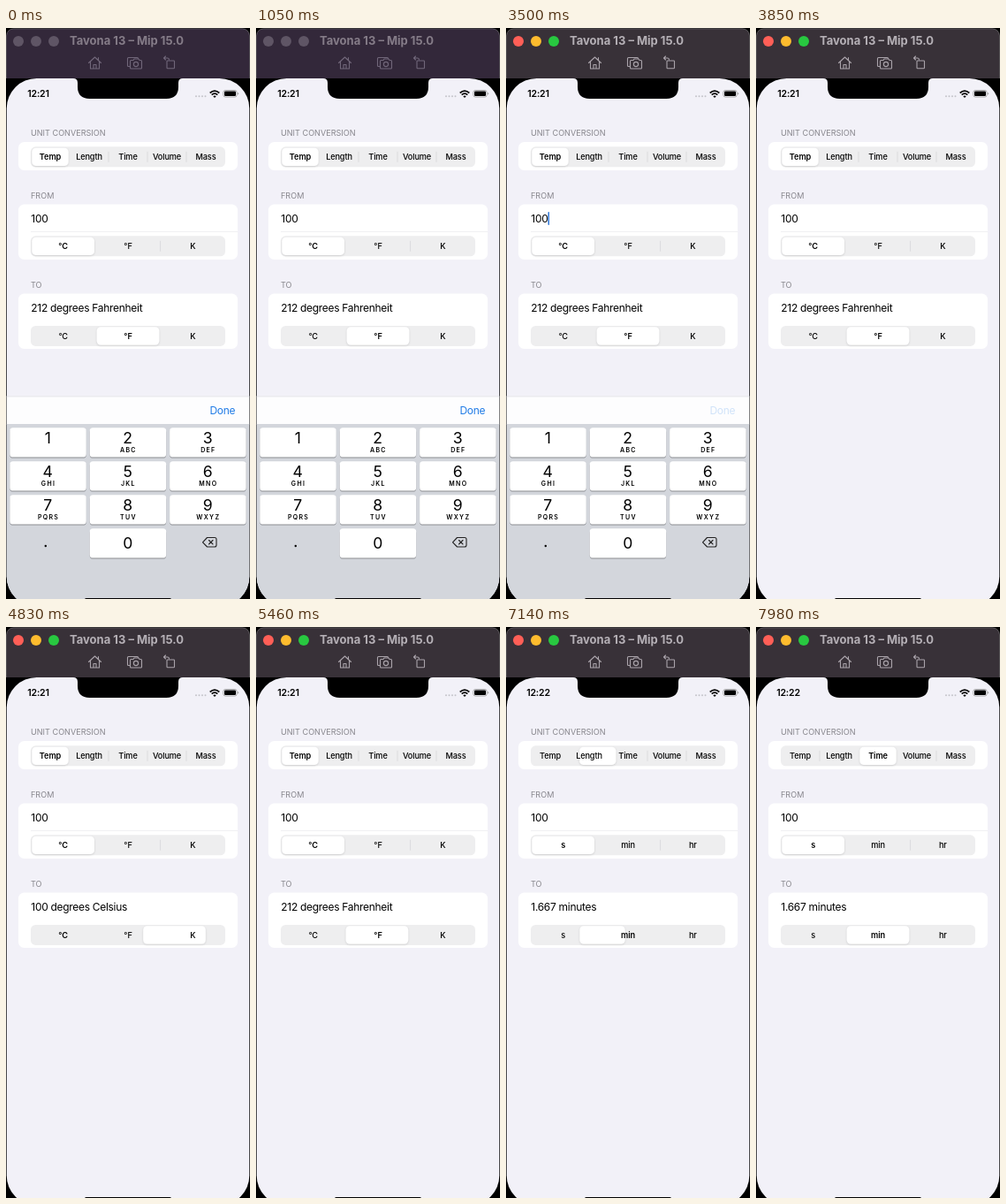
Recreate the animation shown at these times as an HTML page. Size 276 by 646 pixels, loop 8000 ms.

```html
<!DOCTYPE html>
<html lang="en">
<head>
<meta charset="utf-8">
<title>Unit conversion</title>
<style>
html, body { margin: 0; width: 276px; height: 646px; overflow: hidden; background: #000; }
svg { display: block; font-family: Inter, Roboto, sans-serif; }
.mid { text-anchor: middle; }
.head { font-size: 9.1px; fill: #88878d; }
.row { font-size: 12px; letter-spacing: -.3px; }
.seg { font-size: 9.2px; letter-spacing: -.13px; text-anchor: middle; }
.line { fill: none; stroke-linecap: round; stroke-linejoin: round; }
</style>
</head>
<body>
<svg id="stage" width="276" height="646" viewBox="0 0 276 646">
  <defs>
    <clipPath id="screen"><rect x=".7" y="57" width="274.600" height="597.400" rx="34"/></clipPath>
    <filter id="soft" x="-10%" y="-20%" width="120%" height="150%">
      <feDropShadow dx="0" dy=".8" stdDeviation=".9" flood-opacity=".16"/>
    </filter>
  </defs>
  <rect width="276" height="646"/>
  <rect id="bar" x=".5" y=".8" width="275" height="75" rx="8" stroke="#fff" stroke-opacity=".25"/>
  <rect y="57" width="276" height="589"/>
  <g id="lights"></g>
  <text id="title" x="72" y="19.300" font-size="13" font-weight="700">Tavona 13 – Mip 15.0</text>
  <g id="tools" class="line" stroke-width="1.100">
    <path d="M93.500 39.500 100.500 33l7 6.500M95.500 38.500V46h10V38.500M99 46v-4.500h3V46M104.500 36.500V33.500"/>
    <path d="M139.500 43.500H138.500Q137.500 43.500 137.500 42.500V34.500Q137.500 33.500 138.500 33.500H148.500Q149.500 33.500 149.500 34.500"/>
    <path d="M141.500 36.500H144l1-1.500h5l1 1.500H152.500Q153.500 36.500 153.500 37.500V45Q153.500 46 152.500 46H141.500Q140.500 46 140.500 45V37.500Q140.500 36.500 141.500 36.500Z"/>
    <circle cx="147" cy="41" r="2.600"/>
    <rect x="182" y="37" width="8.500" height="8.800" rx=".8"/>
    <path d="M180.500 32l-2 2 2 2M178.500 34H182.500Q184.500 34 184.500 36"/>
  </g>
  <g clip-path="url(#screen)">
    <rect y="57" width="276" height="589" fill="#f2f1f8"/>
    <g fill="#fff">
      <rect x="14" y="129" width="248" height="32" rx="6.500"/>
      <rect x="14" y="199.500" width="248" height="62.500" rx="6.500"/>
      <rect x="14" y="300.500" width="248" height="62.500" rx="6.500"/>
    </g>
    <path d="M28 230.500H262" stroke="#ededf0" stroke-width=".8"/>
    <text class="head" x="28" y="122.200">UNIT CONVERSION</text>
    <text class="head" x="28" y="192.500">FROM</text>
    <text class="head" x="28" y="293.600">TO</text>
    <text class="row" x="28.300" y="219.700">100</text>
    <text class="row" id="result" x="28.300" y="321"></text>
    <rect id="caret" x="47.500" y="208" width="1.500" height="15" rx=".7" fill="#2f76d8"/>
    <g id="controls"></g>
    <g id="keys"></g>
  </g>
  <path d="M76 57Q81 57 81 62V66.500Q81 79.900 94.500 79.900H181.500Q195 79.900 195 66.500V62Q195 57 200 57Z"/>
  <text id="clock" x="36.500" y="78.300" class="mid" font-size="10.600" font-weight="600" letter-spacing="-.2"></text>
  <g id="dots" fill="#c4c4ca"></g>
  <path class="line" stroke="#000" stroke-width="1.700" style="stroke-linecap: butt" d="M230.700 73.500Q236 68.700 241.300 73.500M232.700 75.600Q236 72.700 239.300 75.600"/>
  <path d="M234.300 77.200Q236 75.800 237.700 77.200L236 79Z"/>
  <rect x="245.900" y="70.500" width="15.200" height="7.600" rx="2.300" fill="none" stroke="#999" stroke-width=".8"/>
  <rect x="247" y="71.600" width="13" height="5.400" rx="1.300"/>
  <path d="M262.200 73v2.600q1.100-.4 1.100-1.300t-1.100-1.300" fill="#999"/>
  <rect x="89" y="645" width="98" height="3.500" rx="1.750"/>
</svg>
<script>
const STEP = 70, LOOP = 8000;
const $ = id => document.getElementById(id);
const set = (id, attrs) => { for (const k in attrs) $(id).setAttribute(k, attrs[k]); };

const kinds = ["Temp", "Length", "Time", "Volume", "Mass"];
const units = [["°C", "°F", "K"], ["m", "km", "ft", "yd", "mi"], ["s", "min", "hr"]];

// [start, segment, segment count, result text, kind]
const picks = [
  [0, 1, 3, "212 degrees Fahrenheit", 0],
  [4250, 2, 3, "373.15 kelvins", 0],
  [4800, 0, 3, "100 degrees Celsius", 0],
  [5180, 1, 3, "212 degrees Fahrenheit", 0],
  [5540, 2, 3, "373.15 kelvins", 0],
  [6564, 1, 5, "0.1 kilometers", 1],
  [7085, 1, 3, "1.667 minutes", 2]
];
const tabs = [[0, 0, 5], [6536, 1, 5], [7100, 2, 5]];

const spring = ms => { const x = Math.max(0, ms) * .022; return 1 - (1 + x) * Math.exp(-x); };
const current = (list, t) => list.filter(m => t >= m[0]).pop();

// Left edge and width of the selected pill
function slot(i, n) {
  const w = 220 / n;
  return [28 + i * w + 1.4, w - 2.8];
}

function glide(list, t) {
  let pill = slot(list[0][1], list[0][2]);
  for (const [at, i, n] of list.slice(1)) {
    const p = spring(t - at);
    pill = slot(i, n).map((v, k) => pill[k] + (v - pill[k]) * p);
  }
  return pill;
}

function control(y, labels, chosen, [px, pw], bold = chosen) {
  const w = 220 / labels.length;
  let s = `<rect x="28" y="${y}" width="220" height="23" rx="5.500" fill="#eeeeef"/>`;
  for (let i = 1; i < labels.length; i++)
    if (i !== chosen && i !== chosen + 1)
      s += `<rect x="${28 + i * w - .4}" y="${y + 5.5}" width=".8" height="12" fill="#d6d6da"/>`;
  s += `<rect x="${px}" y="${y + 1.4}" width="${pw}" height="20.200" rx="4.500" fill="#fff" filter="url(#soft)"/>`;
  labels.forEach((label, i) => {
    s += `<text class="seg" x="${28 + (i + .5) * w}" y="${y + 14.6}" font-weight="${i === bold ? 600 : 500}">${label}</text>`;
  });
  return s;
}

function keypad() {
  const letters = ["", "ABC", "DEF", "GHI", "JKL", "MNO", "PQRS", "TUV", "WXYZ"];
  let s = `<rect y="416.500" width="276" height="32" fill="#fdfdfe"/>
    <rect y="416.500" width="276" height=".8" fill="#dfdfe4"/>
    <text id="done" x="230.500" y="437" class="row" fill="#1f7be6">Done</text>
    <rect y="448" width="276" height="230" fill="#d3d6dc"/>`;
  const key = (x, y, digit, sub) => {
    s += `<rect x="${x}" y="${y + 1}" width="86.500" height="33.200" rx="3.600" fill="#8b8d92"/>
      <rect x="${x}" y="${y}" width="86.500" height="33.200" rx="3.600" fill="#fff"/>
      <text class="mid" x="${x + 43}" y="${y + (digit ? 18 : 22.5)}" font-size="17.600">${digit}</text>
      <text class="mid" x="${x + 43.7}" y="${y + 27.8}" font-size="7" font-weight="600" letter-spacing="1.300">${sub}</text>`;
  };
  letters.forEach((sub, i) => key(4.3 + i % 3 * 90.4, 452.3 + Math.floor(i / 3) * 38, i + 1, sub));
  key(94.7, 566.3, 0, "");
  return s + `<circle cx="44.800" cy="586" r="1.200"/>
    <path class="line" stroke="#222" stroke-width="1.100" d="M227.500 576.500H236Q238 576.500 238 578.500V585Q238 587 236 587H227.500L222.500 581.800ZM229.500 579.500l4.500 4.500m0-4.500-4.500 4.500"/>`;
}

function draw(t) {
  const active = t >= 3360;
  set("bar", { fill: active ? "#383138" : "#33283a" });
  set("title", { fill: active ? "#b5b0b6" : "#857c88" });
  set("tools", { stroke: active ? "#aaa4ab" : "#71677a" });
  const lamps = active ? ["#ff5f57", "#febc2e", "#28c840"] : Array(3).fill("#5f5565");
  [...$("lights").children].forEach((c, i) => c.setAttribute("fill", lamps[i]));

  $("clock").textContent = t < 6370 ? "12:21" : "12:22";

  const blink = (t + 910) % 1050;
  const caret = blink < 700 ? Math.min(1, blink / 210) : Math.max(0, 1 - (blink - 700) / 210);
  set("caret", { opacity: t < 3570 ? caret : 0 });

  const drop = spring(t - 3530);
  set("keys", { transform: `translate(0 ${drop * 232})`, visibility: t < 3850 ? "visible" : "hidden" });
  set("done", { opacity: t < 3430 ? 1 : .2 + .8 * drop });

  const [start, tab] = current(tabs, t);
  const [, chosen, , result, kind] = current(picks, t);
  const settled = tab === 0 || t - start > 100;
  $("result").textContent = result;
  $("controls").innerHTML =
    control(134.3, kinds, settled ? tab : tab - 1, glide(tabs, t), settled ? tab : -1) +
    control(235.3, units[kind], 0, slot(0, units[kind].length)) +
    control(336.9, units[kind], chosen, glide(picks, t));
}

$("lights").innerHTML = [14, 34, 54].map(x => `<circle cx="${x}" cy="15" r="6"/>`).join("");
$("dots").innerHTML = [0, 1, 2, 3].map(i => `<circle cx="${215 + i * 3.5}" cy="77.300" r="1"/>`).join("");
$("keys").innerHTML = keypad();

let shown = -1;
const begin = performance.now();
function frame() {
  const t = Math.floor((performance.now() - begin) % LOOP / STEP) * STEP;
  if (t !== shown) draw(shown = t);
  requestAnimationFrame(frame);
}
draw(0);
frame();
</script>
</body>
</html>
```
